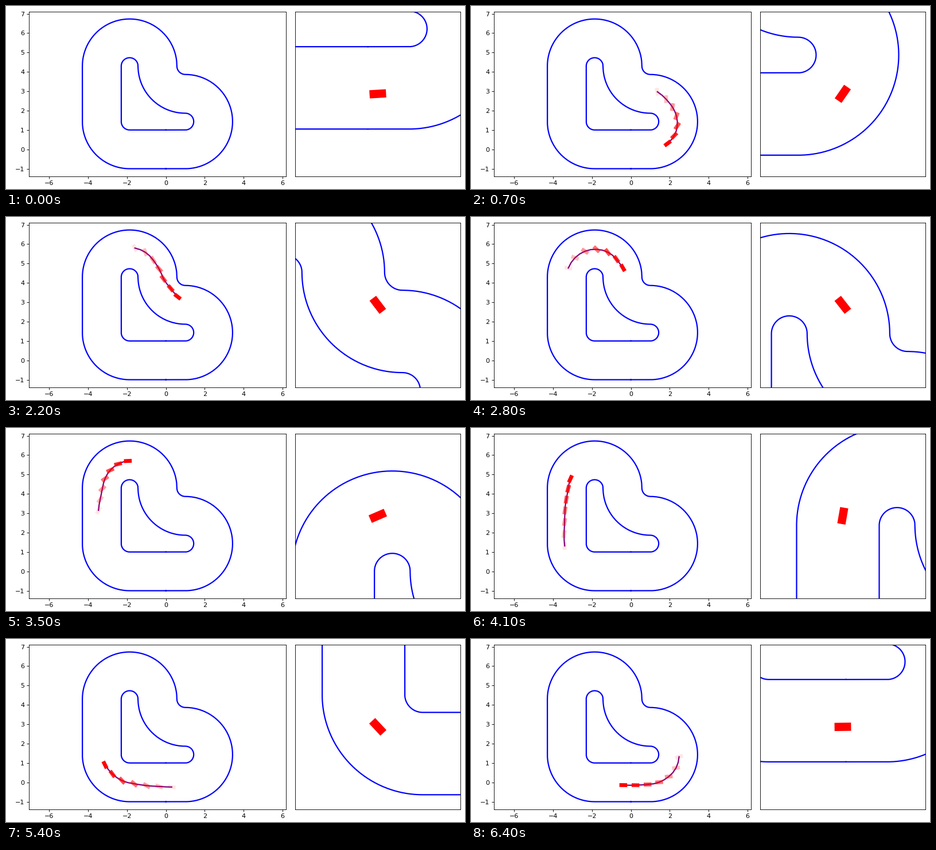
These frames come from a looping animation (800x320 px, 6500 ms). A matplotlib script:

```python
import numpy as np
import matplotlib.pyplot as plt
from matplotlib.animation import FuncAnimation
from matplotlib.patches import Rectangle
from matplotlib.transforms import Affine2D

STEPS, HORIZON = 65, 12
CAR_L, CAR_W = 0.4, 0.2
ARC = 4.5
R = ARC / np.pi

# Track as (length, signed turn radius); 0 means straight
SEGMENTS = [(1, 0), (ARC, R), (ARC / 2, -R), (ARC, R),
            (2 * R, 0), (ARC / 2, R), (2 * R - 1, 0)]
LAP = sum(length for length, _ in SEGMENTS)

# Key points of the lap: step -> distance, distance -> offset to the left
PACE = [(0, 0.24), (3, 1.17), (14, 4.06), (20, 5.65), (23, 6.82), (25, 7.7),
        (28, 8.46), (41, 12.0), (47, 13.7), (54, 16.01), (STEPS, 0.24 + LAP)]
LINE = [(0, -0.15), (2.2, 0), (4.3, 0.115), (6.8, -0.48), (8.7, -0.02),
        (11.9, 0.1), (13.4, -0.07), (14.6, -0.07), (16.2, 0.1),
        (18.6, -0.14), (LAP, -0.15)]


def center_line():
    """Rows of distance, x, y, heading along the middle of the track."""
    rows, s0, x, y, a = [], 0.0, 0.0, 0.0, 0.0
    for length, r in SEGMENTS:
        s = np.linspace(0, length, 150 if r else 2)
        if r:
            h = a + s / r
            px = x + r * (np.sin(h) - np.sin(a))
            py = y - r * (np.cos(h) - np.cos(a))
        else:
            h = np.full_like(s, a)
            px, py = x + s * np.cos(a), y + s * np.sin(a)
        rows.append(np.column_stack([s0 + s, px, py, h]))
        s0, x, y, a = s0 + length, px[-1], py[-1], h[-1]
    return np.vstack(rows)


TRACK = center_line()


def on_track(s, left):
    """Points at distance s, moved sideways from the middle."""
    x, y, h = (np.interp(s, TRACK[:, 0], TRACK[:, c]) for c in (1, 2, 3))
    return np.column_stack([x - left * np.sin(h), y + left * np.cos(h)])


def distance(k):
    k = np.asarray(k, float)
    return np.interp(k % STEPS, *zip(*PACE)) + LAP * (k // STEPS)


def offset(s):
    """Racing line, eased from one key point to the next."""
    at, left = np.array(LINE).T
    i = np.clip(np.searchsorted(at, s, side="right") - 1, 0, len(at) - 2)
    u = (s - at[i]) / (at[i + 1] - at[i])
    return left[i] + (left[i + 1] - left[i]) * u * u * (3 - 2 * u)


def spot(s, drift=0.0):
    s = np.atleast_1d(s) % LAP
    return on_track(s, offset(s) + drift)


def heading(k):
    s = distance(k)
    dx, dy = (spot(s + 0.05) - spot(s - 0.05)).T
    return np.arctan2(dy, dx)


def plan(k):
    """Planned points ahead of the last step, and headings of the cars."""
    i = np.arange(HORIZON + 1)
    t = i / HORIZON
    start = k - 1
    here = distance(start)
    speed = (here - distance(start - 4)) / 4
    # far ahead the plan partly keeps the present speed and runs wide
    s = distance(start + i)
    s = s + 0.35 * t * (here + speed * i - s)
    return spot(s, -0.1 * t ** 2), heading(start - 0.4 + i[:HORIZON // 2 + 1])


def add_car(ax, alpha=1.0):
    car = Rectangle((-CAR_L / 2, -CAR_W / 2), CAR_L, CAR_W, facecolor="red",
                    edgecolor="none", alpha=alpha, zorder=4)
    ax.add_patch(car)
    return car


def place(car, ax, p, a):
    car.set_transform(Affine2D().rotate(a).translate(*p) + ax.transData)


fig = plt.figure(figsize=(10, 4), dpi=80, facecolor="white")
overview = fig.add_axes([0.05, 0.07, 0.56, 0.9])
close = fig.add_axes([0.63, 0.07, 0.36, 0.9])

for ax in (overview, close):
    for side in (1, -1):
        ax.plot(*on_track(TRACK[:, 0], side).T, color="blue", lw=2)

half_y = (4 * R + 2) * 1.1 / 2
half_x = half_y * 448 / 288
overview.set_xlim(1 - R - half_x, 1 - R + half_x)
overview.set_ylim(2 * R - half_y, 2 * R + half_y)
overview.set_xticks(range(-6, 7, 2))
overview.set_yticks(range(-1, 8))
close.set_xticks([])
close.set_yticks([])

path, = overview.plot([], [], color="purple", lw=2, zorder=3)
ghosts = [add_car(overview, a) for a in np.linspace(1, 0.1, HORIZON // 2 + 1)]
hero = add_car(close)


def draw(k):
    x, y = spot(distance(k))[0]
    close.set_xlim(x - 2, x + 2)
    close.set_ylim(y - 2, y + 2)
    place(hero, close, (x, y), heading(k + 0.5)[0])

    # nothing is planned yet at the start of a lap
    pts, angles = plan(k)
    path.set_data(*pts.T)
    path.set_visible(k > 0)
    for car, p, a in zip(ghosts, pts[::2], angles):
        place(car, overview, p, a)
        car.set_visible(k > 0)
    return [path, hero, *ghosts]


anim = FuncAnimation(fig, draw, frames=STEPS, interval=100,
                     init_func=lambda: draw(0), repeat=True, repeat_delay=0)
plt.show()
```
